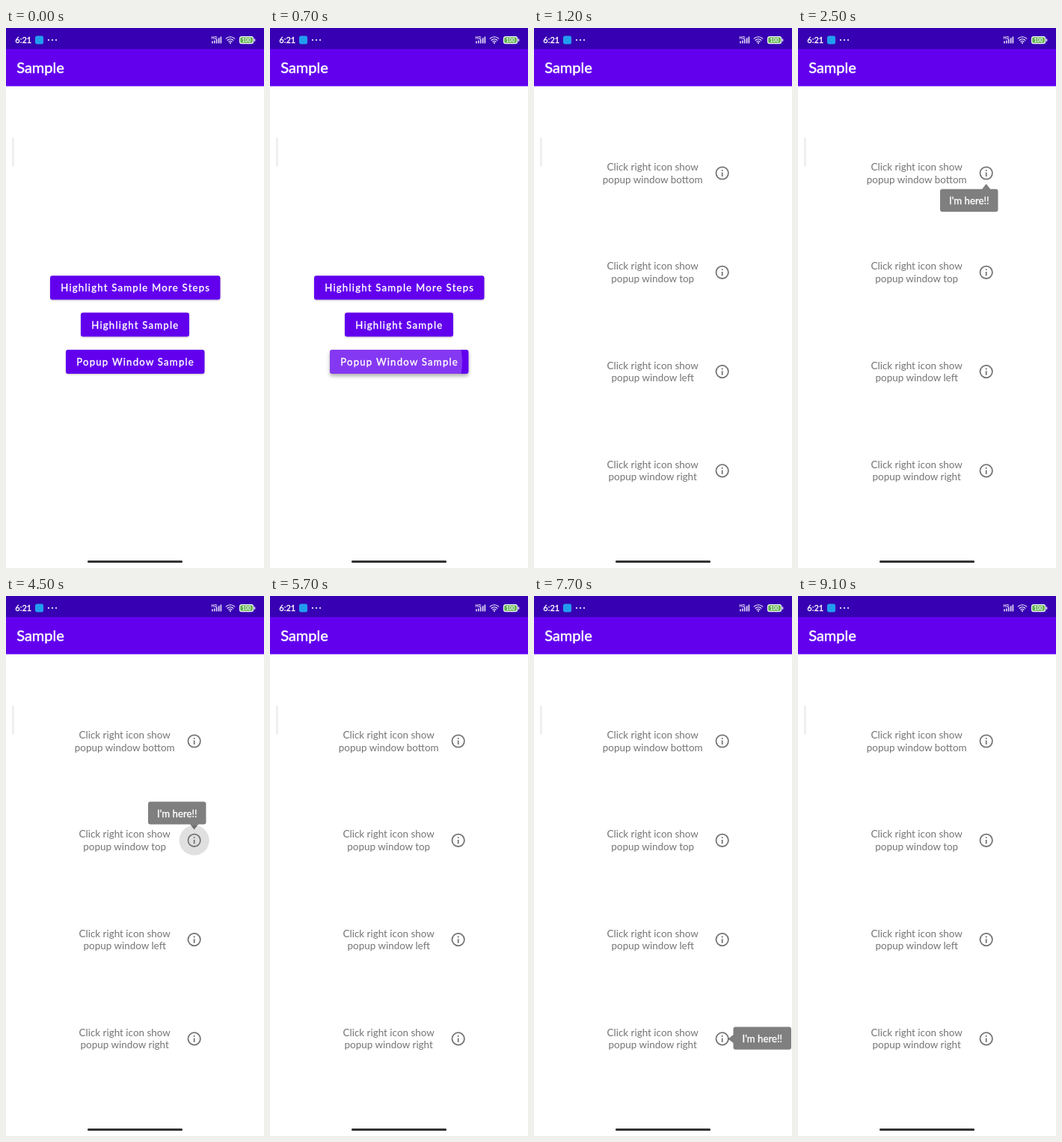
Recreate the animation shown at these times as an HTML page. Size 345 by 720 pixels, loop 9.2 s.

```html
<!DOCTYPE html>
<html lang="en">
<head>
<meta charset="utf-8">
<title>Popup window sample</title>
<style>
  html, body { margin: 0; width: 100%; height: 100%; overflow: hidden; background: #fff; }
  svg { display: block; width: 345px; height: 720px; }
  text { font-family: Lato, "Open Sans", sans-serif; }
  .title, .button, .tip, .clock { fill: #fff; stroke: #fff; stroke-width: .35px; }
  .title { font-size: 20px; stroke-width: .5px; }
  .button { font-size: 13.2px; letter-spacing: 1.22px; }
  .label { font-size: 13.45px; fill: #757575; text-anchor: middle; }
  .tip { font-size: 13.2px; text-anchor: middle; }
  .clock { font-size: 11px; }
  .raised { filter: drop-shadow(0 1px .8px rgba(0, 0, 0, .22)); }
  .pressed { filter: drop-shadow(0 3px 2.5px rgba(0, 0, 0, .32)); }
</style>
</head>
<body>
<svg id="stage" viewBox="0 0 345 720">
  <defs><clipPath id="press"><rect x="80" y="429" width="185.5" height="32" rx="3"/></clipPath></defs>
  <rect width="345" height="720" fill="#fff"/>
  <g id="home"></g>
  <g id="list"></g>
  <rect width="345" height="28" fill="#3700b3"/>
  <g id="status" fill="#fff">
    <text class="clock" x="12.3" y="20">6:21</text>
    <rect x="39" y="10.5" width="11" height="11" rx="2.5" fill="#229df0"/>
    <circle cx="57" cy="16" r="1.1"/><circle cx="62" cy="16" r="1.1"/><circle cx="67" cy="16" r="1.1"/>
    <text x="274.5" y="14.8" font-size="5.2" font-weight="700">HD</text>
    <path d="M276 20.5v-3M279 20.5v-4M281.9 20.5v-5.5M284.7 20.5v-7.2M287.4 20.5v-9" stroke="#fff" stroke-width="1.4"/>
    <path d="M293.8 14.4q6.2-5.2 12.4 0M295.7 16.5q4.3-3.6 8.6 0M297.5 18.5q2.5-2 5 0" fill="none" stroke="#fff" stroke-width="1.1"/>
    <circle cx="300" cy="20" r="1"/>
    <rect x="312.6" y="11.6" width="18" height="9" rx="2.6" fill="#5bb04b" stroke="#fff" stroke-width="1.2"/>
    <rect x="331.7" y="14.2" width="1.5" height="3.8" rx=".7"/>
    <text x="321.6" y="18.7" font-size="7" font-weight="700" text-anchor="middle">100</text>
  </g>
  <rect x="8" y="146" width="3" height="39" rx="1.2" fill="#efefef"/>
  <rect x="109" y="710" width="127" height="3" rx="1.2" fill="#333"/>
</svg>
<script>
const LOOP = 9200, STEP = 100;
const $ = id => document.getElementById(id);

function add(parent, tag, attrs, text) {
  const node = document.createElementNS('http://www.w3.org/2000/svg', tag);
  for (const key in attrs) node.setAttribute(key, attrs[key]);
  if (text) node.textContent = text;
  parent.append(node);
  return node;
}

function page(root) {
  add(root, 'rect', { y: 28, width: 345, height: 692, fill: '#fff' });
  add(root, 'rect', { y: 28, width: 345, height: 49.6, fill: '#6200ee' });
  add(root, 'text', { class: 'title', x: 14.2, y: 60 }, 'Sample');
}

const home = $('home'), list = $('list');
page(home);
page(list);

// Home: three buttons, the last one gets pressed
const buttons = [
  ['Highlight Sample More Steps', 59, 330.3, 227.5],
  ['Highlight Sample', 100, 379.6, 145],
  ['Popup Window Sample', 80, 429, 185.5]
].map(([text, x, y, width]) => {
  const box = add(home, 'rect', { class: 'raised', x, y, width, height: 32, rx: 3, fill: '#6200ee' });
  const label = add(home, 'text', { class: 'button', x: x + 14.2, y: y + 21 }, text);
  return { box, label };
});
const pressed = buttons[2];
const wave = add(home, 'circle', { cx: 165, cy: 445, fill: '#fff', 'fill-opacity': .22, 'clip-path': 'url(#press)' });
home.insertBefore(wave, pressed.label);

// List: four rows with an info icon each
const ICON_X = 251.7;
const rowY = i => 193.5 + i * 132.3;
const ripples = ['bottom', 'top', 'left', 'right'].map((side, i) => {
  const y = rowY(i);
  add(list, 'text', { class: 'label', x: 158.7, y: y - 3.6 }, 'Click right icon show');
  add(list, 'text', { class: 'label', x: 158.7, y: y + 13 }, 'popup window ' + side);
  const ripple = add(list, 'circle', { cx: ICON_X, cy: y, r: 0, fill: '#000' });
  add(list, 'circle', { cx: ICON_X, cy: y, r: 8.2, fill: 'none', stroke: '#757575', 'stroke-width': 1.8 });
  add(list, 'path', { d: `M${ICON_X} ${y - 4.6}v1.9m0 1.8v5.5`, stroke: '#757575', 'stroke-width': 1.8 });
  return ripple;
});

// Bubble outline with its arrow on one side, at position p along it
function outline(x, y, w, h, side, p) {
  const r = 3, a = 5.5, len = 7;
  const arrow = {
    top: `H${p - a}L${p} ${y - len}L${p + a} ${y}`,
    right: `V${p - a}L${x + w + len} ${p}L${x + w} ${p + a}`,
    bottom: `H${p + a}L${p} ${y + h + len}L${p - a} ${y + h}`,
    left: `V${p + a}L${x - len} ${p}L${x} ${p - a}`
  };
  const on = name => name === side ? arrow[name] : '';
  return `M${x + r} ${y}${on('top')}H${x + w - r}q${r} 0 ${r} ${r}${on('right')}V${y + h - r}q0 ${r} ${-r} ${r}` +
    `${on('bottom')}H${x + r}q${-r} 0 ${-r} ${-r}${on('left')}V${y + r}q0 ${-r} ${r} ${-r}z`;
}

function bubble(x, y, h, side, p, lines) {
  const w = 77.5, g = add(list, 'g', {});
  add(g, 'path', { d: outline(x, y, w, h, side, p), fill: '#000', 'fill-opacity': .5 });
  for (let i = 0; i < lines; i++)
    add(g, 'text', { class: 'tip', x: x + w / 2, y: y + 20.3 + i * 18.5 }, "I'm here!!");
  return g;
}

// tap: touch down, calm: ripple gone, hide: bubble closes, fade: closing time
const popups = [
  { node: bubble(190, 214.7, 30.3, 'top', ICON_X, 1), tap: 2000, calm: 2500, hide: 3700, fade: 0 },
  { node: bubble(190, 274.2, 30.3, 'bottom', ICON_X, 1), tap: 4400, calm: 4800, hide: 5000, fade: 100 },
  { node: bubble(153.2, 442, 87, 'right', 458.1, 4), tap: 6000, calm: 6500, hide: 6800, fade: 100 },
  { node: bubble(266.5, 574.5, 30.3, 'left', 590.4, 1), tap: 7400, calm: 7700, hide: 8000, fade: 100 }
];

const PRESS = 600, OPEN = 900;
const clamp = v => Math.max(0, Math.min(1, v));

function draw(time) {
  const t = Math.floor(time % LOOP / STEP) * STEP;

  const held = t >= PRESS;
  pressed.box.setAttribute('class', held ? 'pressed' : 'raised');
  wave.setAttribute('r', held ? 50 + (t - PRESS) * .42 : 0);

  // The list page slides in from the right and slows down
  const left = t < OPEN ? 1 : Math.pow(1 - clamp((t - OPEN + 100) / 400), 3);
  list.setAttribute('transform', `translate(${345 * left} 0)`);
  home.setAttribute('transform', `translate(${-86 * (1 - left)} 0)`);

  popups.forEach(({ node, tap, calm, hide, fade }, i) => {
    const active = t >= tap && t < calm;
    ripples[i].setAttribute('r', active ? (t < tap + 100 ? 12 : 20) : 0);
    ripples[i].setAttribute('fill-opacity', .122 * clamp((calm - t) / 300));
    let alpha = t >= tap + 100 && t < hide ? 1 : 0;
    if (t >= hide && t < hide + fade) alpha = .5;
    node.setAttribute('opacity', alpha);
  });
}

const start = performance.now();
function tick() {
  draw(performance.now() - start);
  requestAnimationFrame(tick);
}
tick();
</script>
</body>
</html>
```
